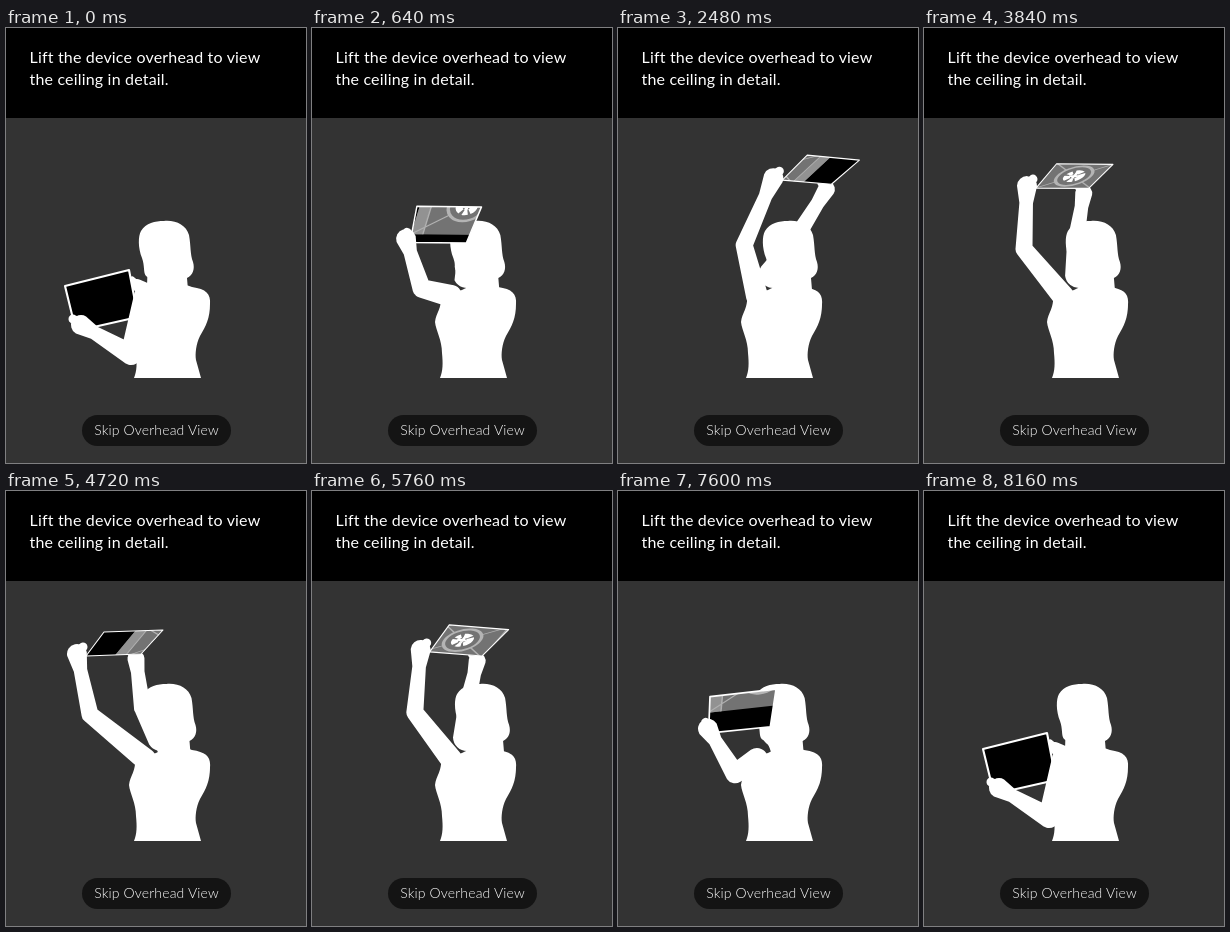
Recreate the animation shown at these times as an HTML page. Size 300x435 px, loop 9840 ms.

```html
<!DOCTYPE html>
<html lang="en">
<head>
<meta charset="utf-8">
<title>Overhead view</title>
<style>
  html, body { margin: 0; width: 100%; height: 100%; overflow: hidden; background: #333; }
  svg { display: block; width: 100%; height: 100%; }
  text { font-family: Lato, "Open Sans", sans-serif; fill: #fff; }
  .head { font-size: 16px; letter-spacing: .18px; }
  .skip { font-size: 14px; font-weight: 300; letter-spacing: .15px; text-anchor: middle; }
</style>
</head>
<body>
<svg viewBox="0 0 300 435">
  <clipPath id="clip"><path class="quad"/></clipPath>
  <rect width="300" height="435" fill="#333"/>
  <rect width="300" height="90"/>
  <text class="head" x="23.5" y="35">Lift the device overhead to view</text>
  <text class="head" x="23.5" y="57">the ceiling in detail.</text>
  <rect x="76" y="387" width="149" height="31" rx="15.5" fill="#141414"/>
  <text class="skip" x="150.5" y="407">Skip Overhead View</text>

  <g fill="#fff">
    <path id="rightArm"/>
    <path id="hair" d="M150 264C148 254 145 251 140 248C137 244 139 238 136 230C132 220 132 208 135 203
      C140 195 149 193 158 193C170 192 180 197 183 207C185 218 184 226 187 234C189 241 187 247 181 250L182 262Z"/>
    <path d="M128 350C131 343 131 335 130 325C130 312 124 303 123 294C124 285 130 280 129 268L150 262
      C165 254 176 255 186 259C200 261 205 266 204 276C204 290 200 298 194 308C190 316 189 326 190 332L195 350Z"/>
  </g>
  <path class="quad"/>
  <g clip-path="url(#clip)">
    <g id="ceiling" fill="none">
      <rect x="-3.12" y="-2.34" width="6.24" height="4.68" fill="#737373"/>
      <path d="M-2.75-2.34V2.34M2.75-2.34V2.34" stroke="#929292" stroke-width=".74"/>
      <path d="M-3.1-2.3L3.1 2.3M3.1-2.3L-3.1 2.3M-2.35-2.34V2.34M2.35-2.34V2.34" stroke="#b0b0b0" stroke-width=".1"/>
      <circle r="1.2" fill="#737373" stroke="#b4b4b4" stroke-width=".22"/>
      <circle r=".5" stroke="#fff" stroke-width=".45" stroke-dasharray=".5 .12 .3 .18"/>
      <path d="M-.4 0H.3M0-.6V.3" stroke="#fff" stroke-width=".22"/>
    </g>
  </g>
  <path class="quad" id="frame" fill="none" stroke="#fff" stroke-linejoin="round"/>
  <path id="leftArm" fill="#fff"/>
</svg>
<script>
const $ = id => document.getElementById(id);
const mix = (a, b, f) => a.map((v, i) => v + (b[i] - v) * f);
const add = (a, b) => a.map((v, i) => v + b[i]);
const clamp = (v, lo, hi) => Math.min(hi, Math.max(lo, v));

// how far the arms are raised, then the device corners clockwise from top left
const low    = [0,   59, 258, 123, 242, 132, 289, 70, 303];
const centre = [1,   131, 133, 196, 143, 167, 173, 114, 164];
const right  = [1,   190, 127, 242, 132, 214, 156, 165, 152];
const left   = [1,   98, 141, 157, 139, 135, 163, 80, 165];
const fall   = [.86, 134, 146, 200, 149, 177, 177, 118, 174];
const half   = mix(centre, right, .42);

const keys = [[0, low], [1080, centre], [1660, centre], [2540, right], [3000, right],
  [4440, left], [5200, left], [6100, half], [6240, half], [7120, fall], [8080, low], [9840, low]];

const slope = (k, i) => (keys[k + 1][1][i] - keys[k][1][i]) / (keys[k + 1][0] - keys[k][0]);

// monotone tangent: zero at holds and turning points
function tangent(k, i) {
  if (k < 1 || k > keys.length - 2) return 0;
  const a = slope(k - 1, i), b = slope(k, i);
  return a * b > 0 ? 2 * a * b / (a + b) : 0;
}

function poseAt(t) {
  const k = keys.findLastIndex(([time]) => time <= t);
  const [t0, a] = keys[k], [t1, b] = keys[k + 1];
  const d = t1 - t0, s = (t - t0) / d, e = s * s * (3 - 2 * s);
  return mix(a, b, e).map((v, i) =>
    v + d * s * (1 - s) * ((1 - s) * tangent(k, i) - s * tangent(k + 1, i)));
}

// tapered segment with round ends
function limb([ax, ay], ra, [bx, by], rb) {
  const len = Math.hypot(bx - ax, by - ay) || 1;
  const nx = (ay - by) / len, ny = (bx - ax) / len;
  return `M${ax + nx * ra} ${ay + ny * ra}L${bx + nx * rb} ${by + ny * rb}`
    + `A${rb} ${rb} 0 0 0 ${bx - nx * rb} ${by - ny * rb}L${ax - nx * ra} ${ay - ny * ra}`
    + `A${ra} ${ra} 0 0 0 ${ax + nx * ra} ${ay + ny * ra}Z`;
}

// the elbow hangs at an offset from the middle of shoulder and hand
function arm(shoulder, rs, bend, re, hand, rh, knuckle) {
  const elbow = add(mix(shoulder, hand, .5), bend);
  const wrist = mix(hand, elbow, .27);
  return limb(shoulder, rs, elbow, re) + limb(elbow, re, wrist, 6.8)
    + limb(wrist, 6.8, hand, rh) + limb(hand, rh * .7, add(hand, knuckle), rh * .45);
}

function draw(t) {
  const [lift, ...c] = poseAt(t);
  const [tl, tr, br, bl] = [0, 2, 4, 6].map(i => c.slice(i, i + 2));
  const raise = (down, up) => mix(down, up, lift);

  const leftHand = add(bl, raise([5, -6], [-9, -2]));
  const rightHand = add(br, raise([-1, -32], [-5, 5]));
  $('leftArm').setAttribute('d', arm([139, 268], 11, raise([18, 44], [-21, 8]), 10.5 - 2 * lift,
    leftHand, 10, raise([-8, -6], [6, -7])));
  $('rightArm').setAttribute('d', arm([155, 246], 14, raise([6, 16], [-6, 10]), 8.5,
    rightHand, 6 + 2.5 * lift, [-5, -6]));

  const mid = mix(mix(tl, br, .5), mix(tr, bl, .5), .5);
  $('hair').setAttribute('transform', `translate(${clamp((mid[0] - 105) * .2, 0, 12)} 0)`);

  const quad = 'M' + [tl, tr, br, bl].join('L') + 'Z';
  document.querySelectorAll('.quad').forEach(q => q.setAttribute('d', quad));
  $('frame').setAttribute('stroke-width', 2.1 - lift);

  // the ceiling stays put while the device pans and tilts below it
  const u = mix(tr, tl, .5).map((v, i) => tr[i] - tl[i] + br[i] - bl[i]).map(v => v / 2);
  const v = bl.map((_, i) => (bl[i] - tl[i] + br[i] - tr[i]) / 2);
  const pan = lift * (150 - mid[0]) / (mid[0] > 150 ? 62 : 40), tilt = 1.4 * (lift - 1);
  const o = mid.map((m, i) => m + u[i] * pan + v[i] * tilt);
  $('ceiling').setAttribute('transform',
    `matrix(${[...u.map(n => n / 4), ...v.map(n => n / 3), ...o]})`);
}

const start = performance.now();
function tick() {
  const t = (performance.now() - start) % 9840;
  draw(Math.floor(t / 80) * 80);
  requestAnimationFrame(tick);
}
tick();
</script>
</body>
</html>
```
